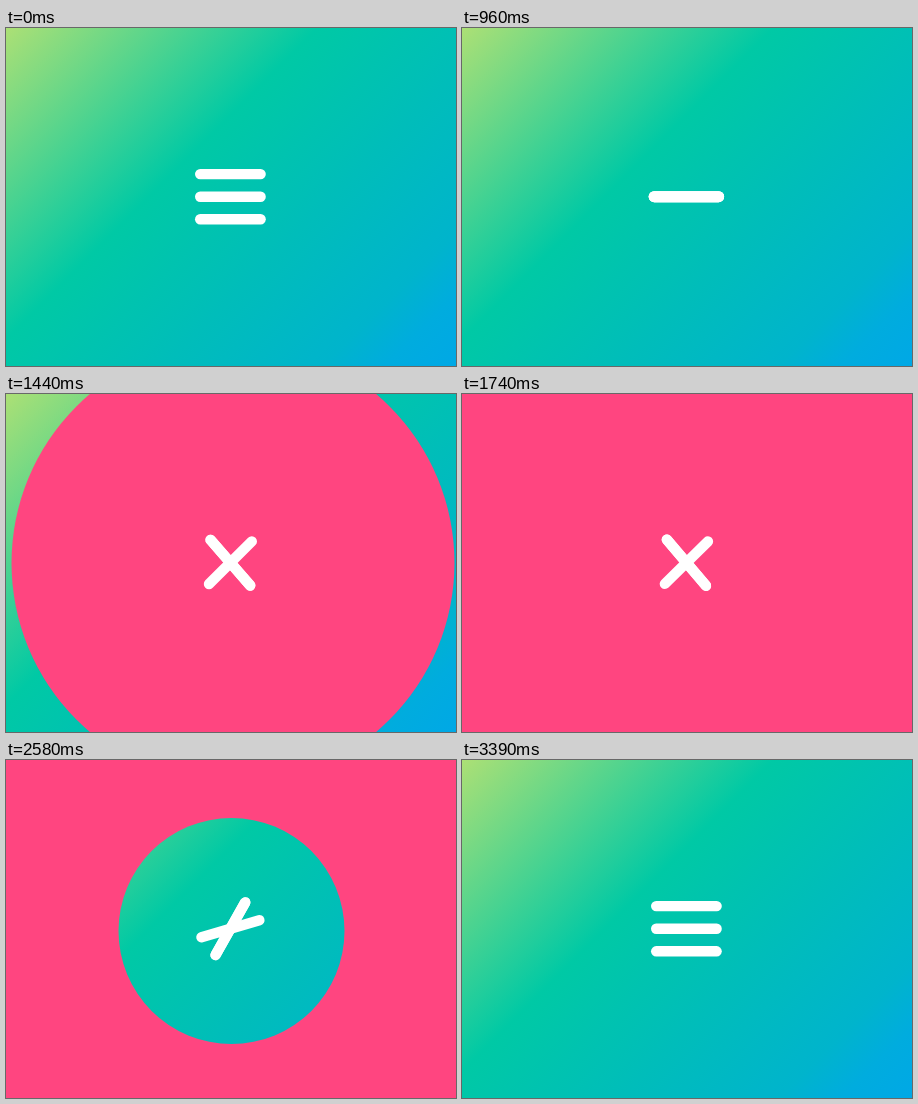
These frames come from a looping animation (450x338 px, 3600 ms). An HTML page:

```html
<!DOCTYPE html>
<html lang="en">
<head>
<meta charset="utf-8">
<title>Menu icon</title>
<style>
  html, body { margin: 0; width: 100%; height: 100%; overflow: hidden; background: #00c4ae; }
  svg { display: block; width: 100%; height: 100%; }
</style>
</head>
<body>
<svg viewBox="0 0 450 338" preserveAspectRatio="none">
  <defs>
    <linearGradient id="sky" gradientUnits="userSpaceOnUse" x1="0" y1="0" x2="394" y2="394">
      <stop offset="0" stop-color="#ace075"/>
      <stop offset=".395" stop-color="#00c9a5"/>
      <stop offset=".63" stop-color="#00bdba"/>
      <stop offset=".83" stop-color="#00b4cc"/>
      <stop offset=".91" stop-color="#00acde"/>
      <stop offset="1" stop-color="#00a8e6"/>
    </linearGradient>
  </defs>
  <rect width="450" height="338" fill="url(#sky)"/>
  <circle id="pink" cx="227" cy="169" r="0" fill="#ff4580"/>
  <circle id="green" cx="225.5" cy="171" r="0" fill="url(#sky)"/>
  <g id="icon" stroke="#fff" stroke-width="10.4" stroke-linecap="round">
    <path d="M-30.2 0H30.2"/>
    <path d="M-30.2 0H30.2"/>
    <path d="M-30.2 0H30.2"/>
  </g>
</svg>
<script>
const LOOP = 3600, STEP = 30, GAP = 22.6;
const CROSS_A = 49.7, CROSS_B = 130.3, OVERSHOOT = 137;
const find = id => document.getElementById(id);
const pinkDisc = find('pink'), greenDisc = find('green'), iconGroup = find('icon');
const [upperBar, middleBar, lowerBar] = iconGroup.children;

// eased progress from 0 to 1 between two times
function ease(t, from, to) {
  const p = Math.min(1, Math.max(0, (t - from) / (to - from)));
  return p < .5 ? 2 * p * p : 1 - 2 * (1 - p) * (1 - p);
}

// radius of a circle that bursts open
const burst = (t, from) => t < from ? 0 : Math.min(600, 113 * ((t - from) / 130) ** 2);

const place = (bar, y, angle) =>
  bar.setAttribute('transform', `translate(0 ${y}) rotate(${angle})`);

function draw(t) {
  const filled = t >= 2700;
  pinkDisc.setAttribute('r', filled ? 0 : burst(t, 1258));
  greenDisc.setAttribute('r', filled ? 0 : burst(t, 2450));

  const scale = 1
    + .24 * (ease(t, 515, 780) - ease(t, 780, 1065))
    + .115 * (ease(t, 2900, 3180) - ease(t, 3180, 3395));
  iconGroup.setAttribute('transform', `translate(224.4 168.7) scale(${scale})`);

  const gap = GAP * (1 - ease(t, 650, 930) + ease(t, 2900, 3180));
  const open = ease(t, 1000, 1480);
  const a = CROSS_A * open + (180 - CROSS_A) * ease(t, 2290, 2850);
  const b = OVERSHOOT * open
    - (OVERSHOOT - CROSS_B) * ease(t, 1490, 2230)
    + (180 - CROSS_B) * ease(t, 2230, 2820);
  place(upperBar, -gap, a);
  place(middleBar, 0, a);
  place(lowerBar, gap, b);
}

const begin = performance.now();
function tick() {
  const t = (performance.now() - begin) % LOOP;
  draw(Math.floor(t / STEP) * STEP);
  requestAnimationFrame(tick);
}
tick();
</script>
</body>
</html>
```
